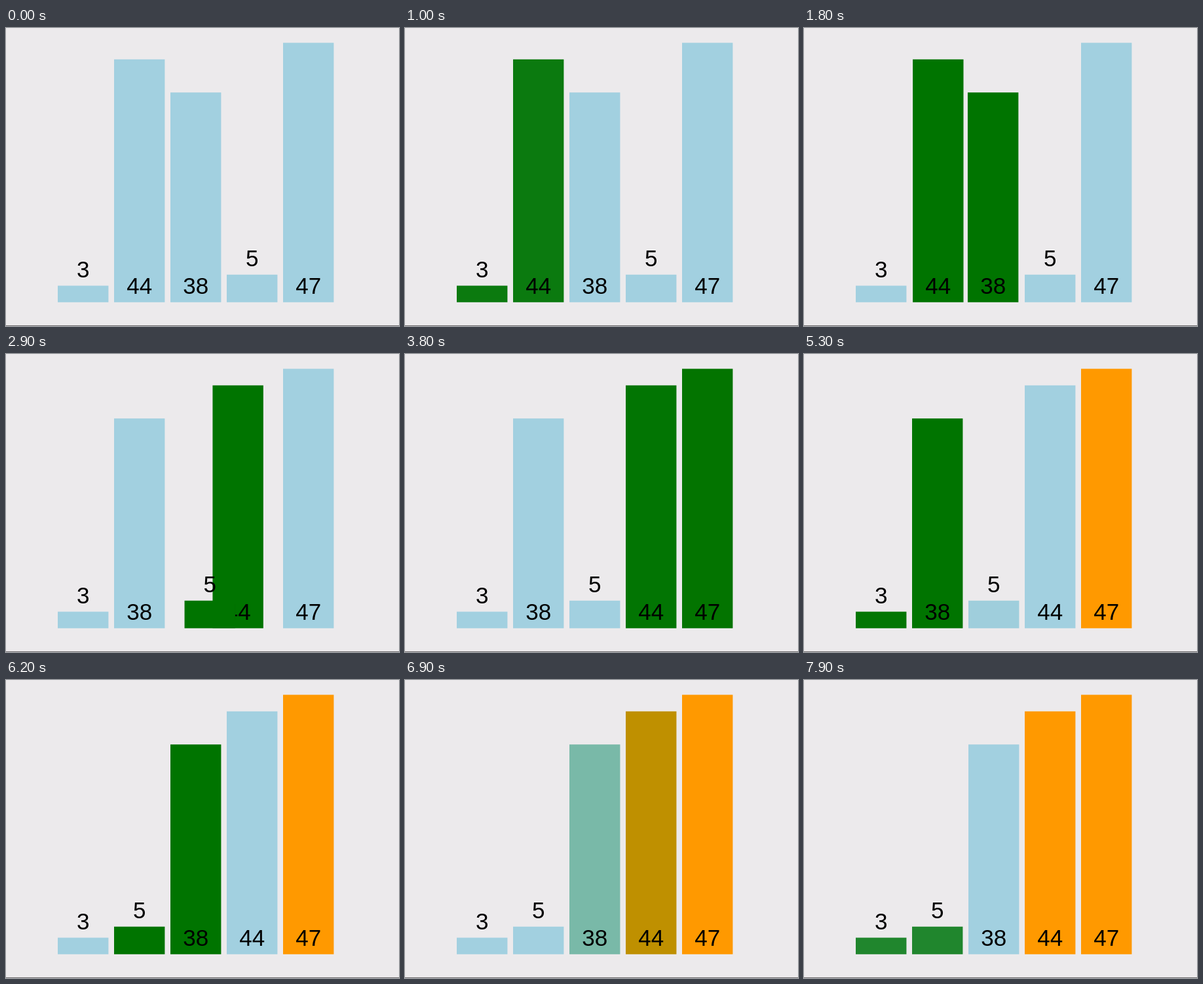
These frames come from a looping animation (600 px wide and 454 px high, 8 s). An HTML page with a canvas:

```html
<!DOCTYPE html>
<html lang="en">
<head>
<meta charset="utf-8">
<title>Bubble sort</title>
<style>
  html, body { margin: 0; width: 100%; height: 100%; overflow: hidden; background: #eceaec; }
  canvas { display: block; }
</style>
</head>
<body>
<canvas id="stage" width="600" height="454"></canvas>
<script>
const ctx = document.getElementById('stage').getContext('2d');

const LOOP = 8000, FADE = 350;
const LEFT = 79, PITCH = 86, WIDTH = 77.4, BASE = 417.8, UNIT = 8.41;
const BLUE = [162, 208, 224], GREEN = [0, 116, 0], ORANGE = [255, 153, 0];

// Painting order stays fixed while bars trade slots.
const values = [3, 44, 38, 5, 47];

// Each step: start time, then the compared pair, a swap, or a bar that is done.
const steps = [
  { at: 740, compare: [3, 44] },
  { at: 1240, compare: [44, 38] },
  { at: 1750, swap: [44, 38] },
  { at: 2220, compare: [44, 5] },
  { at: 2690, swap: [44, 5] },
  { at: 3220, compare: [44, 47] },
  { at: 3750, compare: [], done: 47 },
  { at: 4755, compare: [3, 38] },
  { at: 5245, compare: [38, 5] },
  { at: 5745, swap: [38, 5] },
  { at: 6235, compare: [38, 44] },
  { at: 6690, compare: [], done: 44 },
  { at: 7680, compare: [3, 5] }
];

const ease = u => u < 0.5 ? 4 * u ** 3 : 1 - 4 * (1 - u) ** 3;
const mix = (a, b, p) => a + (b - a) * p;

function nextState(state, step) {
  const next = state.map(bar => ({ ...bar }));
  const find = v => next[values.indexOf(v)];
  if (step.swap) {
    const [a, b] = step.swap.map(find);
    [a.slot, b.slot] = [b.slot, a.slot];
  } else {
    next.forEach(bar => { if (bar.color !== ORANGE) bar.color = BLUE; });
    step.compare.forEach(v => { find(v).color = GREEN; });
    if (step.done) find(step.done).color = ORANGE;
  }
  return next;
}

const states = [values.map((v, slot) => ({ slot, color: BLUE }))];
steps.forEach((step, i) => states.push(nextState(states[i], step)));

function drawBar(value, slot, color) {
  const x = LEFT + slot * PITCH;
  const top = BASE - value * UNIT;
  ctx.fillStyle = `rgb(${color.map(Math.round).join(',')})`;
  ctx.fillRect(x, top, WIDTH, BASE - top);
  ctx.fillStyle = '#000';
  ctx.fillText(value, x + WIDTH / 2, value < 10 ? top - 12.6 : 404.6);
}

function draw(t) {
  ctx.fillStyle = '#eceaec';
  ctx.fillRect(0, 0, 600, 454);
  ctx.fillStyle = '#6c6b6c';
  ctx.fillRect(0, 453, 600, 1);
  ctx.font = '35px "Liberation Sans", Arial, Helvetica, sans-serif';
  ctx.textAlign = 'center';

  const n = steps.filter(step => step.at <= t).length;
  const to = states[n];
  const from = states[Math.max(0, n - 1)];
  const p = n ? ease(Math.min(1, (t - steps[n - 1].at) / FADE)) : 1;
  values.forEach((v, i) => {
    const a = from[i], b = to[i];
    drawBar(v, mix(a.slot, b.slot, p), a.color.map((c, k) => mix(c, b.color[k], p)));
  });
}

function tick() {
  draw(performance.now() % LOOP);
  requestAnimationFrame(tick);
}
tick();
</script>
</body>
</html>
```
